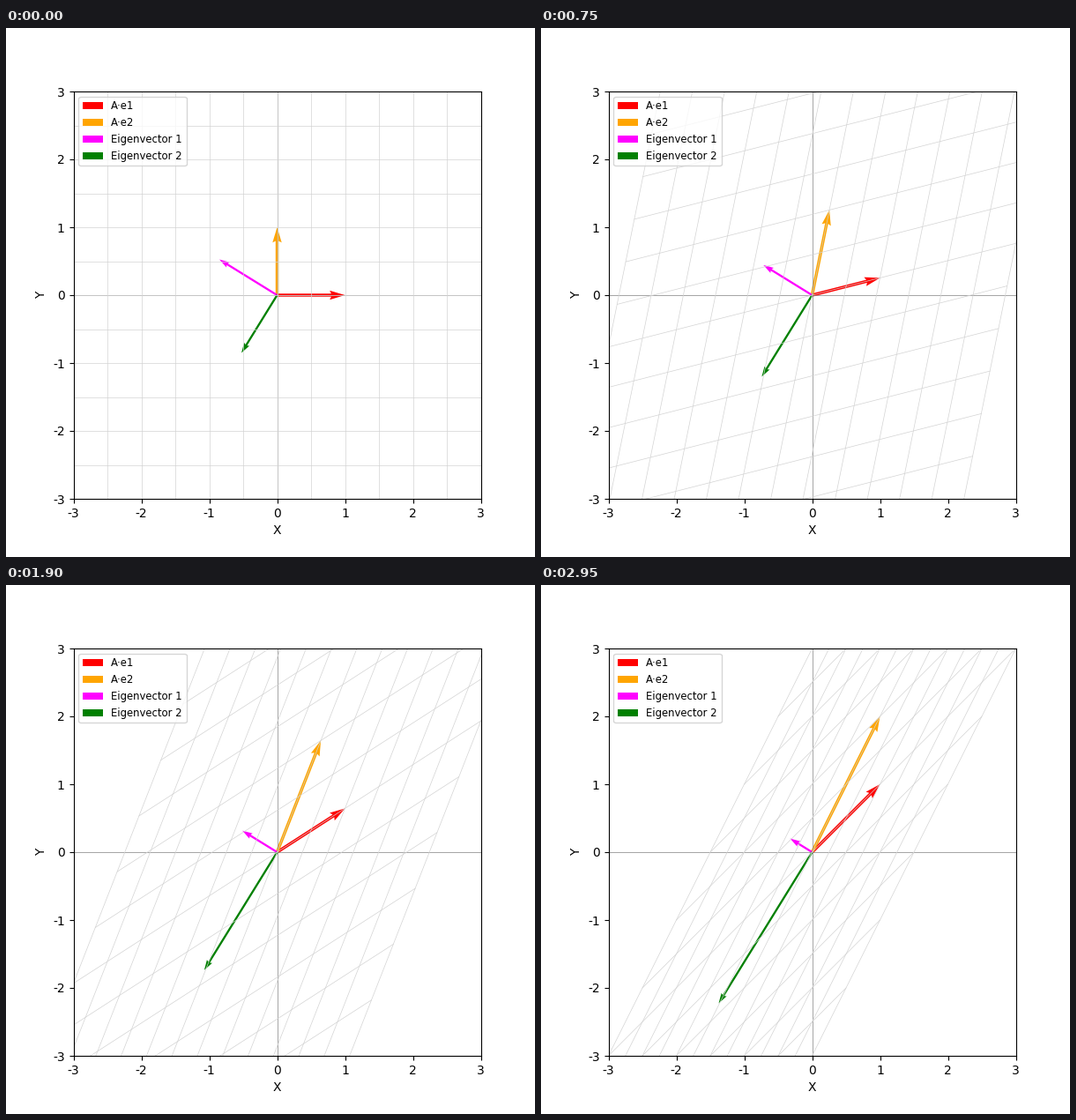
A matplotlib script for the animation above (3000 ms loop, 600 by 600 pixels).

```python
import numpy as np
import matplotlib.pyplot as plt
from matplotlib.animation import FuncAnimation

FRAMES = 60
LIMIT = 3
A = np.array([[1.0, 1.0], [1.0, 2.0]])

plt.rcParams["font.family"] = "DejaVu Sans"
plt.rcParams["axes.unicode_minus"] = False

fig, ax = plt.subplots(figsize=(6, 6), dpi=100)
ax.set_xlim(-LIMIT, LIMIT)
ax.set_ylim(-LIMIT, LIMIT)
ax.set_aspect("equal")
ax.set_xlabel("X")
ax.set_ylabel("Y")
ax.axhline(0, color="gray", lw=0.5)
ax.axvline(0, color="gray", lw=0.5)

# Each segment is a 2x2 array: columns are its end points.
ticks = np.linspace(-LIMIT, LIMIT, 13)
segments = [np.array([[c, c], [-LIMIT, LIMIT]]) for c in ticks]
segments += [np.array([[-LIMIT, LIMIT], [c, c]]) for c in ticks]
grid = [ax.plot(*s, color="lightgray", lw=0.5)[0] for s in segments]

# Unit eigenvectors of A, smaller eigenvalue first.
phi = (1 + np.sqrt(5)) / 2
norm = np.hypot(1, phi)
vectors = np.array([[1, 0], [0, 1], [-phi / norm, 1 / norm], [-1 / norm, -phi / norm]])


def arrow(v, color, label, width=None):
    return ax.quiver(0, 0, *v, angles="xy", scale_units="xy", scale=1,
                     color=color, label=label, width=width)


arrows = [
    arrow(vectors[0], "red", "A·e1"),
    arrow(vectors[1], "orange", "A·e2"),
    arrow(vectors[2], "magenta", "Eigenvector 1", 0.005),
    arrow(vectors[3], "green", "Eigenvector 2", 0.005),
]
ax.legend(loc="upper left", fontsize="small")


def update(frame):
    t = frame / (FRAMES - 1)
    M = (1 - t) * np.eye(2) + t * A
    for line, s in zip(grid, segments):
        line.set_data(*(M @ s))
    for q, v in zip(arrows, vectors):
        x, y = M @ v
        q.set_UVC(x, y)
    return grid + arrows


anim = FuncAnimation(fig, update, frames=FRAMES, interval=50,
                     init_func=lambda: update(0), repeat=True, repeat_delay=0)
plt.show()
```
